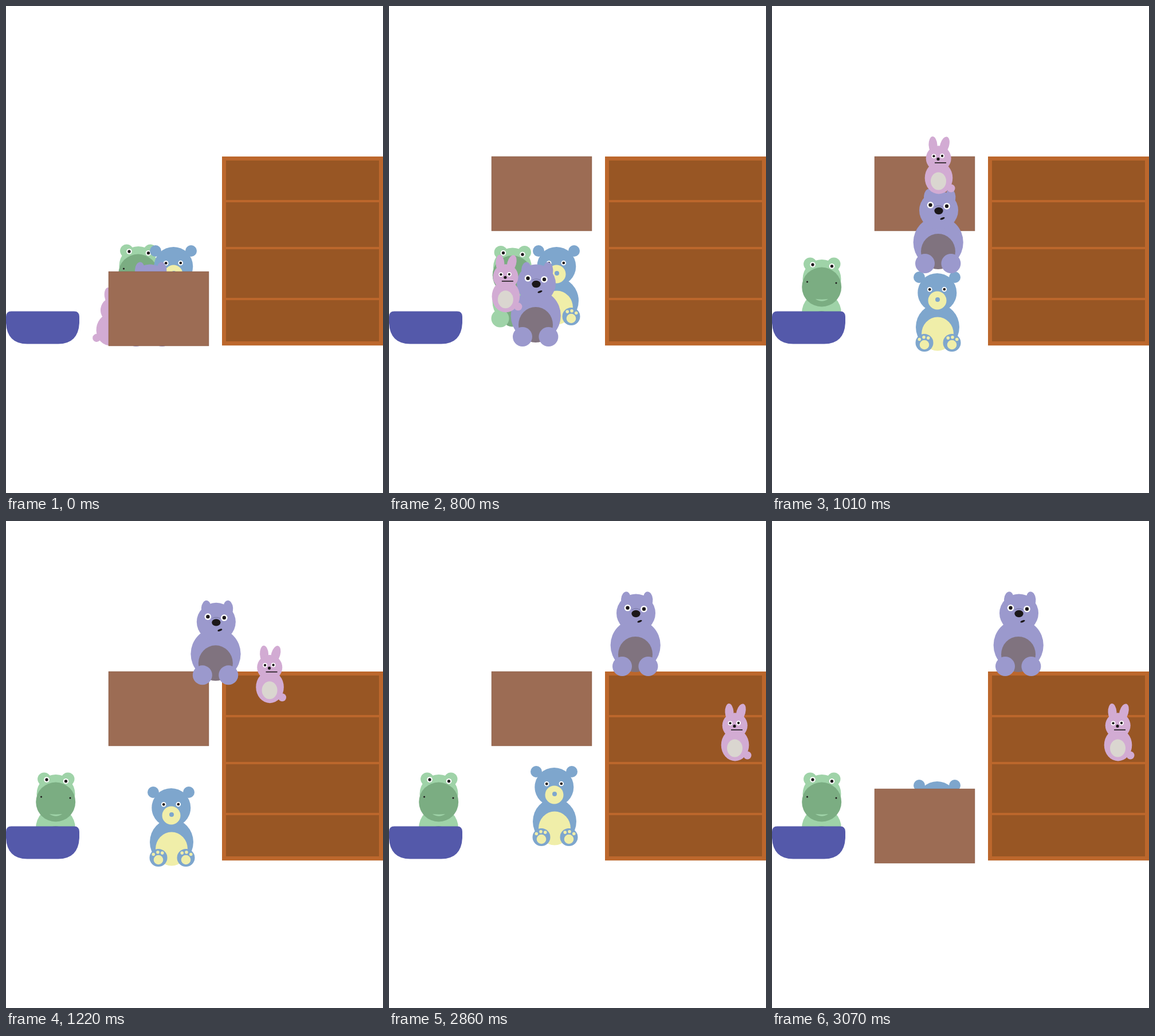
An HTML page that plays this animation: 658x851 px, repeating every 3.14 s.

```html
<!DOCTYPE html>
<html lang="en">
<head>
<meta charset="utf-8">
<title>Toys tidied away</title>
<style>
  html, body { margin: 0; height: 100%; overflow: hidden; background: #fff; }
  svg { display: block; width: 658px; height: 851px; }
</style>
</head>
<body>
<svg id="scene" viewBox="0 0 658 851">
  <path fill="#bc672c" d="M377 263H658V593.3H377Z"/>
  <path fill="#985624" d="M384 270H651V339H384ZM384 343H651V421H384ZM384 425H651V510H384ZM384 514H651V586H384Z"/>
  <g id="frog"></g>
  <g id="bear"></g>
  <g id="wolf"></g>
  <g id="bunny"></g>
  <path id="bowl" fill="#5459aa" d="M9 533.5H119Q128 533.5 128 543V554Q126 590.5 91 590.5H37Q2 590.5 0 554V543Q0 533.5 9 533.5Z"/>
  <rect id="box" x="179" width="175" height="130" fill="#9c6c54" stroke="#7c4f3c" stroke-width=".4"/>
</svg>
<script>
const byId = id => document.getElementById(id);
const LOOP = 3140, STEP = 70, INK = '#1b1719';

// Shapes are drawn where each toy finally rests.
const oval = (fill, x, y, rx, ry = rx, turn = 0) =>
  `<ellipse fill="${fill}" cx="${x}" cy="${y}" rx="${rx}" ry="${ry}" transform="rotate(${turn} ${x} ${y})"/>`;
const pair = (fill, x, gap, y, rx, ry, turn = 0) =>
  oval(fill, x - gap, y, rx, ry, turn) + oval(fill, x + gap, y, rx, ry, -turn);
const eye = (x, y, r) => oval('#fff', x, y, r) + oval(INK, x, y, r * .55);
const line = (d, color, width) => `<path d="${d}" fill="none" stroke="${color}" stroke-width="${width}"/>`;

const mint = '#9fd3a8', green = '#7bad82';
byId('frog').innerHTML =
  oval(mint, 86.5, 537, 34.5, 37) + oval(green, 86.5, 557, 20, 24) +
  pair(mint, 86.5, 21, 566.5, 15.5) +
  pair(mint, 87.3, 20.7, 451, 11.5) + oval(mint, 87, 477, 33.5, 34) +
  oval(green, 86.7, 491, 34.5) +
  `<path fill="${mint}" d="M76 512Q87 513.5 98 512Q87 519.5 76 512Z"/>` +
  eye(71, 452, 4.8) + eye(104.5, 454.7, 4.8) +
  oval(INK, 61.5, 482, 1.5) + oval(INK, 112, 484, 1.5);

const blue = '#7ea6cd', cream = '#f0eea9';
const paw = (x, side) => oval(blue, x, 588.5, 15.5) + oval(cream, x, 592, 8.3) +
  [-1, 0, 1].map(i => oval(cream, x + side * (7.75 * i - 1), 578.7 + 2.6 * i * i - 1.2 * i, 2.8)).join('');
byId('bear').innerHTML =
  oval(blue, 289, 561, 38, 40) + oval(cream, 289, 573, 28, 29.5) +
  paw(266, 1) + paw(314, -1) +
  pair(blue, 288, 31, 474, 10) + oval(blue, 288.3, 501, 34) +
  eye(275.2, 495.3, 4.3) + eye(300.8, 495, 4.3) +
  oval(cream, 288.5, 514.5, 16) + oval(blue, 289, 513, 4);

const violet = '#9b99cd';
byId('wolf').innerHTML =
  oval(violet, 430.2, 217, 43.6, 45) + oval('#80737f', 430, 233, 30, 31) +
  pair(violet, 429.7, 22.7, 254, 17) +
  pair(violet, 432.7, 19.2, 137, 8.5, 13.5, 4) + oval(violet, 431, 161, 34, 33.5) +
  eye(416.5, 151.8, 5.8) + eye(445, 153.7, 5.8) +
  line('M424 155Q431 151 438 155', '#65658c', .7) +
  oval(INK, 431, 162, 7.6, 6.2) + oval(INK, 437.5, 175.3, 4.2, 1.7, -20);

const pink = '#d2abd3';
byId('bunny').innerHTML =
  oval(pink, 625.5, 409.5, 7) +
  oval(pink, 594, 334, 7.5, 15, -3) + oval(pink, 614.3, 334, 7.8, 15, 16) +
  oval(pink, 604, 391.5, 24.3, 28) + oval(pink, 603.7, 357.3, 22) +
  '<g id="bunnyFront">' + oval('#dad6d0', 603.5, 397, 13.5, 15.5) +
  eye(595.5, 353.3, 3.9) + eye(610, 353, 3.9) +
  oval(INK, 603, 358.4, 2.6) + line('M597 365H617', INK, 1.6) + '</g>';

// Each route starts at an offset and adds up hops.
const hop = (start, end, dx, dy, lift = 0) => t => {
  const k = Math.min(1, Math.max(0, (t - start) / (end - start))) ** 1.2;
  return [dx * k, dy * k - 4 * lift * k * (1 - k)];
};
const routes = {
  frog: [[144, -23], hop(230, 300, -15.5, 2.5), hop(800, 1010, -128.5, 20.5, 20)],
  bear: [[4, -46], hop(800, 1010, -4, 46), hop(2790, 2860, 0, -36), hop(2860, 3070, 0, 24)],
  wolf: [[-180, 324], hop(230, 300, 6, 0), hop(800, 1010, 34, -128), hop(1010, 1360, 140, -196, 75)],
  bunny: [[-420.5, 171], hop(730, 1010, 107.5, -262, 9), hop(1010, 1360, 313, 91, 60)],
  box: [[0, 464], hop(30, 100, 0, -201), hop(2860, 3070, 0, 205)]
};
const BUNNY_TURNED = 'translate(182 564.7) rotate(8) scale(-1 1) translate(-604 -391)';

function offsetAt([from, ...hops], t) {
  return hops.map(h => h(t)).reduce(([x, y], [dx, dy]) => [x + dx, y + dy], from);
}

// Stop-motion timing: short poses separated by long holds.
function poseTime(t) {
  const start = [2860, 1360, 800, 300, 100, 0].find(s => t >= s);
  const moving = start === 800 || start === 2860;
  return moving ? start + Math.floor((t - start) / STEP) * STEP : start;
}

function draw(now) {
  const t = poseTime(now % LOOP);
  for (const name in routes)
    byId(name).setAttribute('transform', `translate(${offsetAt(routes[name], t)})`);

  const turned = t < 300;
  if (turned) byId('bunny').setAttribute('transform', BUNNY_TURNED);
  byId('bunnyFront').style.display = turned ? 'none' : '';

  const boxInFront = t < 100 || t >= 2860;
  byId('scene').insertBefore(byId('box'), byId(boxInFront ? 'bowl' : 'frog'));
  requestAnimationFrame(draw);
}
draw(performance.now());
</script>
</body>
</html>
```
